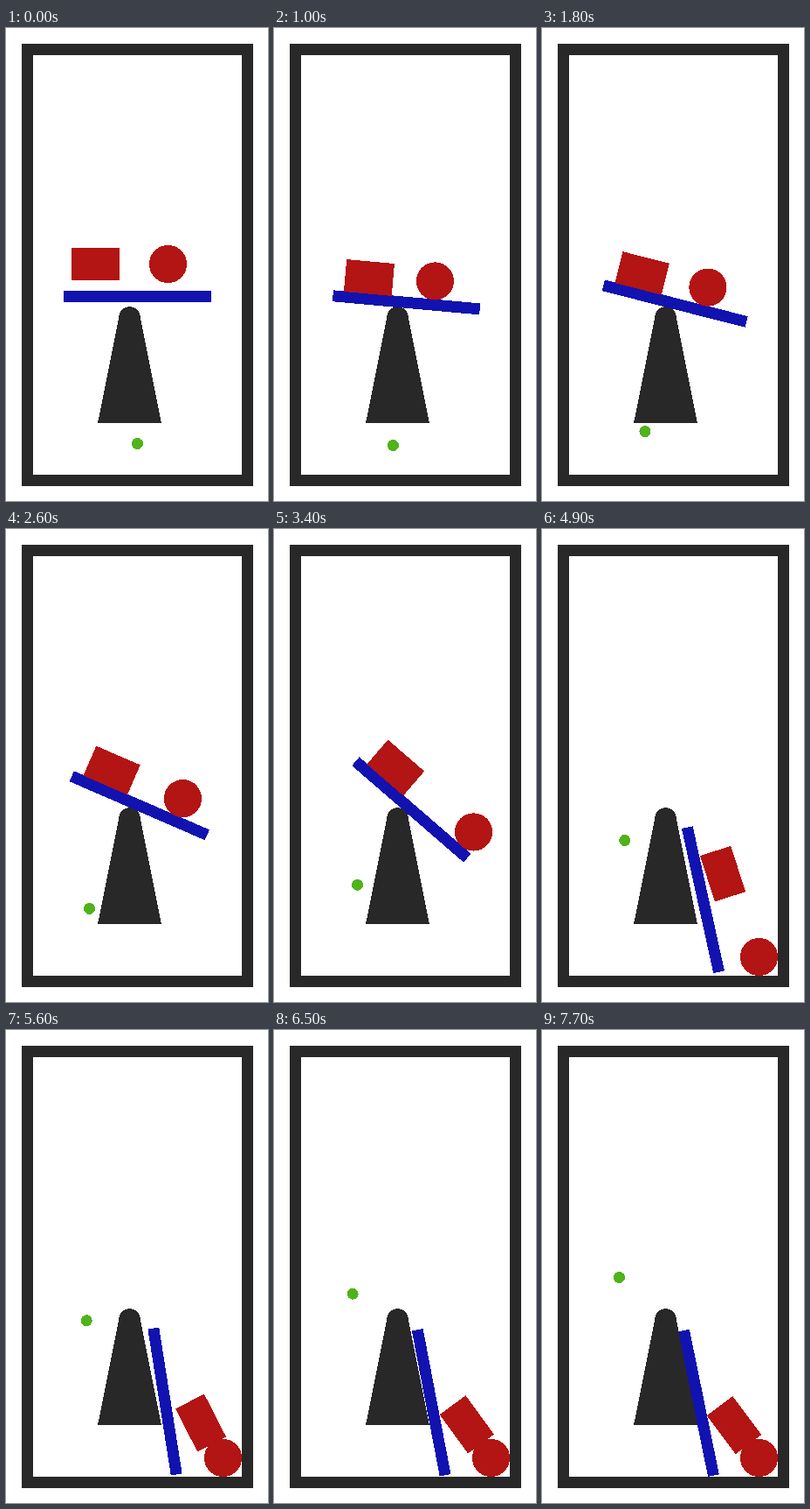
Write an HTML page that moves like this. It is 300x540 px and loops after 8 s.

```html
<!DOCTYPE html>
<html lang="en">
<head>
<meta charset="utf-8">
<title>Balance</title>
<style>
  html, body { margin: 0; width: 100%; height: 100%; overflow: hidden; background: #fff; }
  svg { display: block; }
</style>
</head>
<body>
<svg width="300" height="540" viewBox="0 0 300 540" shape-rendering="crispEdges">
  <rect x="24.5" y="24.5" width="252" height="492" fill="none" stroke="#282828" stroke-width="13"/>
  <g fill="#282828">
    <path d="M130 327L153 327L178 451H105Z"/>
    <circle cx="141.5" cy="330.5" r="12.3"/>
  </g>
  <rect id="plank" x="-84.5" y="-6.5" width="169" height="13" fill="#1212b0"/>
  <rect id="box" x="-27.5" y="-18.5" width="55" height="37" fill="#b31414"/>
  <circle id="ball" r="21.6" fill="#b31414"/>
  <circle id="dot" r="6.5" fill="#4fb31b"/>
</svg>
<script>
const LOOP = 8000, STEP = 100, SETTLED = 7.2;
const PIVOT = { x: 141.5, y: 330.5 };
const { min, max, sin, cos, PI } = Math;

const after = (t, start) => max(0, t - start);
const ramp = (t, a, b) => min(1, after(t, a) / (b - a));
const pulse = (t, a, b) => sin(PI * ramp(t, a, b));

function place(id, x, y, angle = 0) {
  document.getElementById(id).setAttribute("transform", `translate(${x} ${y}) rotate(${angle})`);
}

// t in seconds
function draw(t) {
  const fall = gap => max(0, gap - 50 * t * t);
  const wobble = pulse(t, 4.5, 6.7);

  // The plank tips over the pivot, then slides down to lean on its side
  const angle = min(78.4, 11.4 * after(t, 0.55) + 12.2 * after(t, 2.72)) + 2.6 * wobble;
  const slide = min(101, 9 - 4.5 * ramp(t, 0.8, 2.6) + 42 * after(t, 3.25) ** 2) - 2.3 * wobble;
  const lift = 18 + fall(6) + 7.4 * wobble;

  // World position of a point d along the plank and n above it
  function onPlank(d, n) {
    const a = angle * PI / 180, along = slide + d, up = lift + n;
    return [PIVOT.x + along * cos(a) + up * sin(a), PIVOT.y + along * sin(a) - up * cos(a)];
  }
  place("plank", ...onPlank(0, 0), angle);

  // The box sticks until the plank stops, then slides off onto the ball
  const slip = ramp(t, 4.7, 5.4);
  const d = -45 - 3 * after(1, t) + 78 * slip - 2.4 * wobble;
  const n = 24.4 + fall(18.6) - fall(6) + 10.2 * slip + 2.1 * wobble;
  place("box", ...onPlank(d, n), angle - 25.4 * ramp(t, 4.6, 6));

  // The ball rolls off the end and drops into the corner
  const drop = after(t, 3.4);
  const roll = 30.5 + 4.5 * after(1, t) + 2.9 * after(t, 1) ** 3;
  const ball = drop
    ? [min(248.5, 229.5 + 20 * drop), min(488.5, 346.5 + 72 * drop + 50 * drop * drop)]
    : onPlank(roll, 27.2 + fall(15.8) - fall(6));
  place("ball", ...ball);

  // The dot drifts left, then rises steadily
  place("dot",
    150.5 - 55 * ramp(t, 0, 2.6) ** 1.43 + 4 * pulse(t, 3.4, 5) - 7 * ramp(t, 4.2, SETTLED),
    max(282.5, 474.5 + 2 * ramp(t, 0, 1) - 33.9 * after(t, 1.33)));
}

const start = performance.now();
function tick() {
  const ms = (performance.now() - start) % LOOP;
  draw(min(SETTLED, Math.floor(ms / STEP) * STEP / 1000));
  requestAnimationFrame(tick);
}
tick();
</script>
</body>
</html>
```
